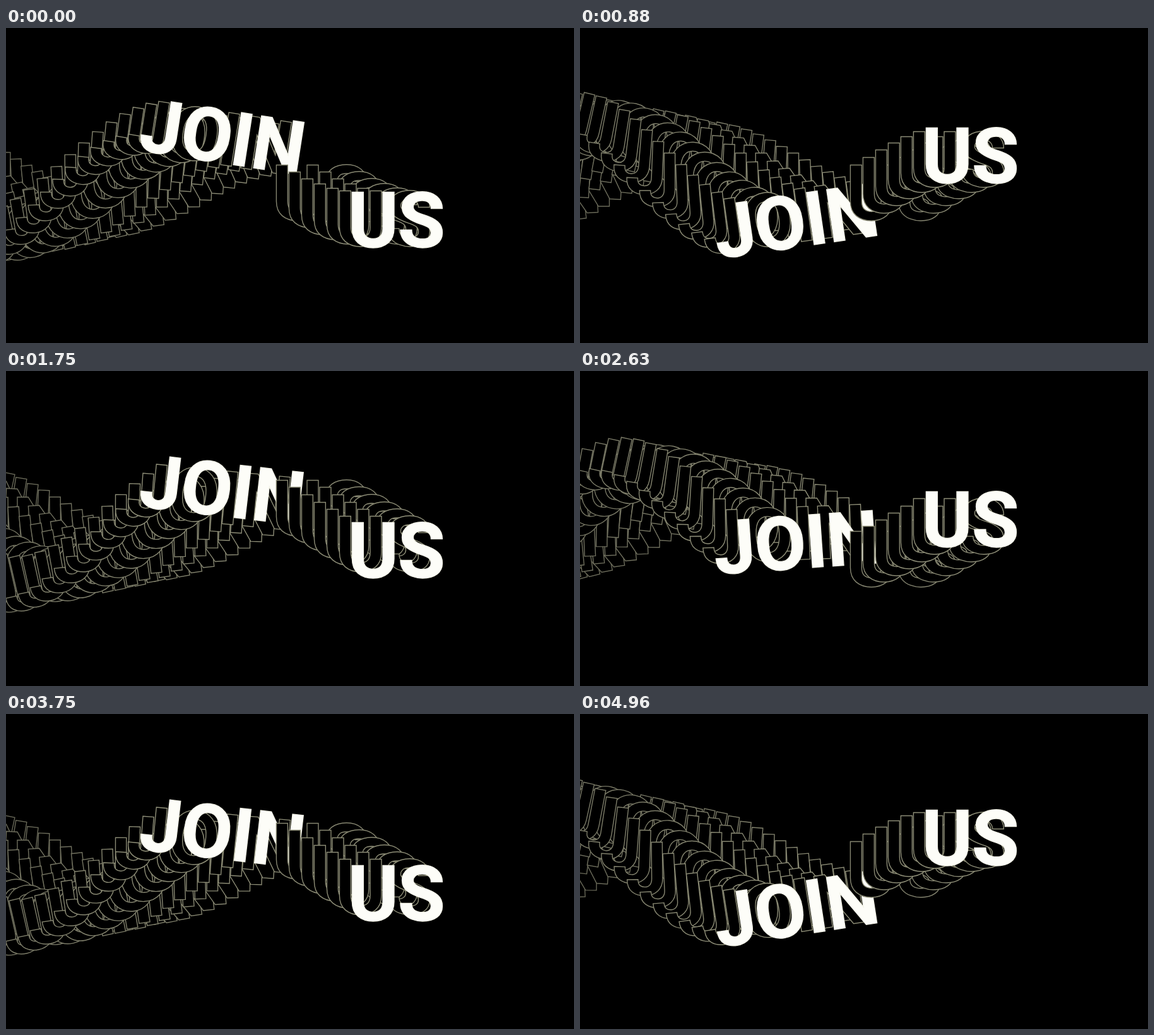
Recreate the animation shown at these times as an HTML page with a canvas. Size 900x500 px, loop 5 s.

```html
<!DOCTYPE html>
<html lang="en">
<head>
<meta charset="utf-8">
<title>Join us</title>
<style>
html, body { margin: 0; width: 100%; height: 100%; overflow: hidden; background: #000; }
canvas { display: block; }
</style>
</head>
<body>
<canvas id="stage" width="900" height="500"></canvas>
<script>
const ctx = document.getElementById('stage').getContext('2d');
const LOOP = 5000, FPS = 24, CYCLE = 48;
const GAP = 20;                    // horizontal distance between echoes
const LAG = 2 * Math.PI / 30;      // wave delay per echo

// left and baseline are relative to the pivot at (x, y)
const join = { text: 'JOIN', size: 118, x: 341, y: 246.5, left: -127, baseline: 36,
               swing: -69, tilt: 8.8, shift: 0.6, echoes: 26 };
const us = { text: 'US', size: 122, x: 619, y: 250.5, left: -71.5, baseline: 43,
             swing: 55, tilt: 0, shift: -0.9, echoes: 6 };

function setFont(word) {
  ctx.font = `700 ${word.size}px Roboto, Arial, sans-serif`;
  ctx.letterSpacing = '-1px';
}

for (const word of [join, us]) {
  setFont(word);
  word.left += ctx.measureText(word.text).actualBoundingBoxLeft;
}

function drawCopy(word, frame, k) {
  const wave = Math.cos(2 * Math.PI * (frame + word.shift) / CYCLE - k * LAG);
  const fade = 1 - k / 80;
  ctx.save();
  ctx.translate(word.x - k * GAP, word.y + word.swing * wave * (1 + 0.01 * k));
  ctx.rotate(word.tilt * wave * (1 + 0.039 * k) * Math.PI / 180);
  ctx.fillStyle = k ? '#000' : '#fdfdf8';
  ctx.strokeStyle = k ? `rgb(${145 * fade}, ${145 * fade}, ${122 * fade})` : '#f4f4e8';
  ctx.lineWidth = 1.4;
  ctx.fillText(word.text, word.left, word.baseline);
  ctx.strokeText(word.text, word.left, word.baseline);
  ctx.restore();
}

function draw(now) {
  const frame = Math.floor(now % LOOP * FPS / 1000 + 0.1);
  ctx.fillStyle = '#000';
  ctx.fillRect(0, 0, 900, 500);
  for (const word of [join, us]) {
    setFont(word);
    for (let k = word.echoes; k >= 0; k--) drawCopy(word, frame, k);
  }
}

const start = performance.now();
function tick() {
  draw(performance.now() - start);
  requestAnimationFrame(tick);
}
tick();
</script>
</body>
</html>
```
